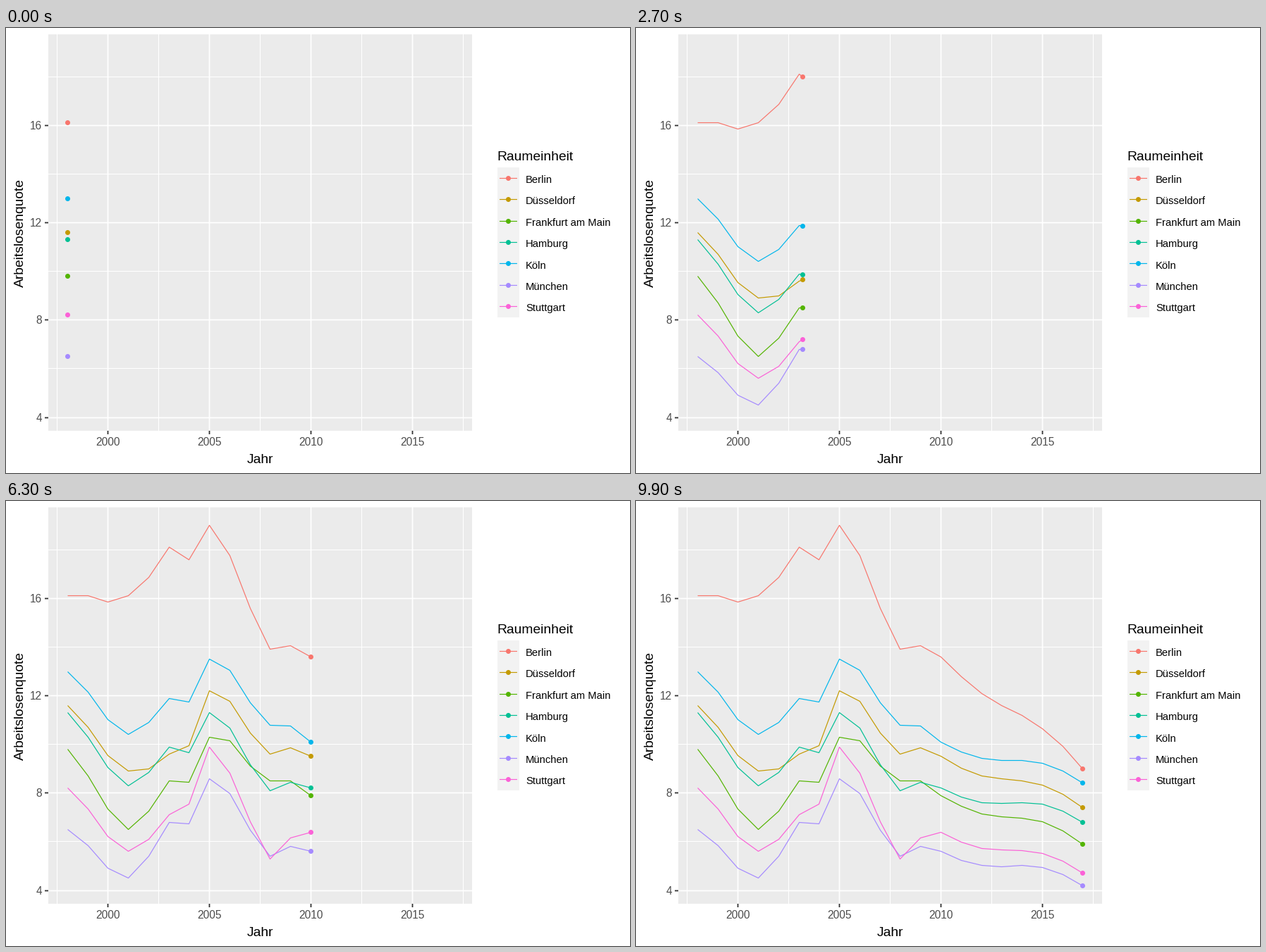
Write a matplotlib script that moves like this. It is 885x632 px and loops after 10000 ms.

```python
import numpy as np
import matplotlib.pyplot as plt
from matplotlib.animation import FuncAnimation
from matplotlib.patches import Rectangle

W, H, DPI = 885, 632, 64
PX = 72 / DPI  # one pixel in points
FRAMES, INTERVAL = 100, 100
LEFT, RIGHT, TOP, BOTTOM = 60, 661.2, 9.1, 571.7  # panel

plt.rcParams["font.family"] = "Liberation Sans"
plt.rcParams["path.simplify"] = False

YEARS = np.arange(1998, 2018)
# Each year is reached on a whole frame
ARRIVAL = np.round((YEARS - YEARS[0]) / 19 * (FRAMES - 1))

# Unemployment rate of each city at the turning points
TURNS = [1998, 2001, 2003, 2005, 2008, 2010, 2017]
CITIES = {
    "Berlin": ("#F8766D", [16.1, 16.1, 18.1, 19.0, 13.9, 13.6, 9.0]),
    "Düsseldorf": ("#C49A00", [11.6, 8.9, 9.6, 12.2, 9.6, 9.5, 7.4]),
    "Frankfurt am Main": ("#53B400", [9.8, 6.5, 8.5, 10.3, 8.5, 7.9, 5.9]),
    "Hamburg": ("#00C094", [11.3, 8.3, 9.9, 11.3, 8.1, 8.2, 6.8]),
    "Köln": ("#00B6EB", [13.0, 10.4, 11.9, 13.5, 10.8, 10.1, 8.4]),
    "München": ("#A58AFF", [6.5, 4.5, 6.8, 8.6, 5.4, 5.6, 4.2]),
    "Stuttgart": ("#FB61D7", [8.2, 5.6, 7.1, 9.9, 5.3, 6.4, 4.7]),
}
COLORS = [color for color, _ in CITIES.values()]


def trend():
    """Swing between the turning points, shared by all cities."""
    bumps = {2000: -0.25, 2002: -0.25, 2004: -0.95, 2006: 0.45, 2009: 0.3}
    swing = np.array([bumps.get(year, 0) for year in YEARS.tolist()])
    u = np.clip((YEARS - 2010) / 7, 0, 1) * np.pi
    return swing + 0.1 * np.sin(u) - 0.27 * np.sin(2 * u)


RATES = [np.interp(YEARS, TURNS, turns) + trend() for _, turns in CITIES.values()]


def to_x(year):
    return LEFT + (np.asarray(year) - 1997.05) / 20.9 * (RIGHT - LEFT)


def to_y(rate):
    return BOTTOM - (np.asarray(rate) - 3.46) / 16.28 * (BOTTOM - TOP)


def mid(v):
    """Centre of the pixel that holds v."""
    return np.floor(v) + 0.5


fig = plt.figure(figsize=(W / DPI, H / DPI), dpi=DPI, facecolor="white")
ax = fig.add_axes([0, 0, 1, 1])
ax.set(xlim=(0, W), ylim=(H, 0))
ax.axis("off")


def rect(x0, y0, x1, y1, color):
    ax.add_patch(Rectangle((x0, y0), x1 - x0, y1 - y0, fc=color, lw=0, zorder=0))


def label(x, y, text, size, color="black", **kw):
    ax.text(x, y, text, fontsize=size * PX, color=color, va="baseline", **kw)


def stroke(x, y, color, width=1.2, z=3):
    line, = ax.plot(x, y, color=color, lw=width * PX, snap=False, zorder=z,
                    solid_joinstyle="round", solid_capstyle="butt")
    return line


def dots(x, y):
    return ax.scatter(x, y, s=(7 * PX) ** 2, c=COLORS, linewidths=0, zorder=4)


# Panel and grid
x0, x1, y0, y1 = 60, 661, 9, 572
rect(x0, y0, x1, y1, "#EBEBEB")
for x in mid(to_x(np.arange(1997.5, 2018, 5))):
    stroke([x, x], [y0, y1], "white", 1, 1)
for y in mid(to_y(np.arange(6, 19, 4))):
    stroke([x0, x1], [y, y], "white", 1, 1)
for year in range(2000, 2016, 5):
    x = mid(to_x(year))
    stroke([x, x], [y0, y1], "white", 1.8, 2)
    stroke([x, x], [y1, y1 + 5], "#333333", 1.8, 2)
    label(x, 593, str(year), 15.5, "#4D4D4D", ha="center")
for rate in range(4, 17, 4):
    y = mid(to_y(rate))
    stroke([x0, x1], [y, y], "white", 1.8, 2)
    stroke([x0 - 5, x0], [y, y], "#333333", 1.8, 2)
    label(51, np.floor(y) + 6, str(rate), 15.5, "#4D4D4D", ha="right")

label(360.5, 618, "Jahr", 19.2, ha="center")
label(25, 290.5, "Arbeitslosenquote", 19.2, ha="center", rotation=90,
      rotation_mode="anchor")

# Legend
KEY = 30.4
rows = 198 + KEY * np.arange(len(CITIES))
label(696.5, 188, "Raumeinheit", 19.2)
rect(697, 198, 728, 411, "#F2F2F2")
for name, color, top in zip(CITIES, COLORS, rows):
    y = mid(top + KEY / 2)
    stroke([700, 725], [y, y], color)
    label(737, round(top + 22), name, 14.8)
dots(np.full(len(rows), 712.5), mid(rows + KEY / 2))

# Moving parts
lines = [stroke([], [], color) for color in COLORS]
heads = dots(np.zeros(len(COLORS)), np.zeros(len(COLORS)))


def update(frame):
    done = ARRIVAL <= frame
    now = np.interp(frame, ARRIVAL, YEARS)
    xs = mid(to_x(np.append(YEARS[done], now)))
    tips = []
    for line, rates in zip(lines, RATES):
        rate = np.interp(frame, ARRIVAL, rates)
        ys = mid(to_y(np.append(rates[done], rate)))
        line.set_data(xs, ys)
        line.set_visible(frame > 0)
        tips.append((xs[-1], ys[-1]))
    heads.set_offsets(tips)
    return [*lines, heads]


anim = FuncAnimation(fig, update, frames=FRAMES, interval=INTERVAL,
                     repeat=True, repeat_delay=0, blit=False)
plt.show()
```
